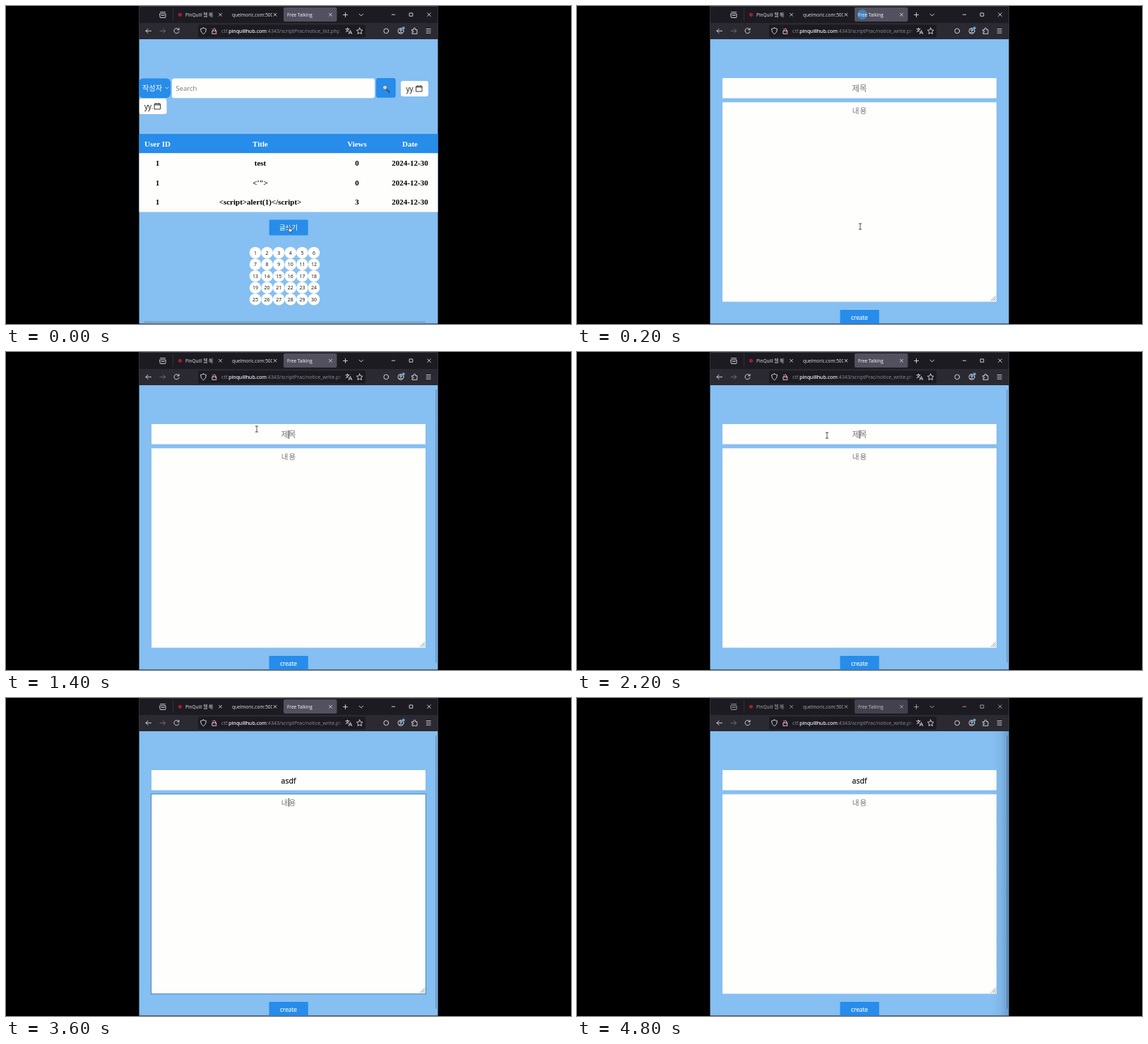
Recreate the animation shown at these times as an HTML page. Size 800 by 450 pixels, loop 5 s.

```html
<!DOCTYPE html>
<html lang="ko">
<head>
<meta charset="utf-8">
<title>Free Talking</title>
<style>
  html, body { margin: 0; width: 100%; height: 100%; overflow: hidden; background: #000; }
  svg { display: block; width: 100vw; height: 100vh; }
  text { font-family: 'Open Sans', 'Noto Sans CJK KR', 'Noto Sans CJK', sans-serif; white-space: pre; }
  .mid { text-anchor: middle; }
  .table text { font: bold 11px 'Liberation Serif', serif; text-anchor: middle; }
  .line { fill: none; stroke: #e0e0e6; stroke-width: .9; stroke-linecap: round; stroke-linejoin: round; }
</style>
</head>
<body>
<svg viewBox="0 0 800 450">
  <defs>
    <linearGradient id="shade">
      <stop offset="0" stop-color="#0b2748" stop-opacity="0"/>
      <stop offset=".5" stop-color="#0b2748" stop-opacity=".06"/>
      <stop offset="1" stop-color="#0b2748" stop-opacity=".24"/>
    </linearGradient>
    <linearGradient id="fade"><stop stop-color="#1c1b22" stop-opacity="0"/><stop offset="1" stop-color="#1c1b22"/></linearGradient>
    <clipPath id="tabClip"><rect x="393" y="2" width="76" height="20" rx="2"/></clipPath>
    <clipPath id="tabText"><path d="M254 0H297V24H254ZM320 0H377V24H320Z"/></clipPath>
    <clipPath id="urlText"><rect x="303" y="26" width="173" height="19"/></clipPath>
    <clipPath id="view"><rect x="188.5" y="47" width="423" height="402.5"/></clipPath>
  </defs>
  <rect width="800" height="450"/>

  <g clip-path="url(#view)">
    <rect x="188" y="47" width="424" height="403" fill="#86bff1"/>
    <g id="list"></g>
    <g id="write">
      <path fill="#fefefd" d="M206 102H594V130.5H206Z"/>
      <path fill="#fefefd" d="M206 136.3H594V418.5H206Z"/>
      <rect id="focus" x="205.5" y="135.8" width="389" height="283" fill="none" stroke="#3f7db5" stroke-width=".9"/>
      <text id="title" class="mid" x="400" y="121"></text>
      <text class="mid" x="400.5" y="151.5" font-size="10.5" letter-spacing="1.2" fill="#777">내용</text>
      <path class="line" style="stroke:#777;stroke-width:.8" d="M586.5 417L593 410.5M589.3 417L593 413.3M592 417L593 416"/>
      <rect x="372.5" y="430" width="55.3" height="22" rx="1" fill="#278cea"/>
      <text class="mid" x="400" y="444.3" font-size="8.3" fill="#fff" stroke="#fff" stroke-width=".15">create</text>
      <g id="suggest">
        <rect x="205.8" y="130.4" width="388.4" height="11.6" rx="2" fill="#2b2a33"/>
        <text x="209" y="138.7" font-size="6.3" fill="#f4f4f6">asdf</text>
      </g>
      <rect id="caret" width=".9" height="12" fill="#222"/>
      <rect id="scroll" x="608.4" y="53" width="1.4" height="387" rx=".7" fill="#6690b8"/>
    </g>
    <rect id="edge" x="588" y="47" width="24" height="403" fill="url(#shade)"/>
  </g>

  <path fill="#1c1b22" d="M188.5 0H611.5V24H188.5Z"/>
  <path fill="#2b2a33" d="M188.5 24H611.5V47H188.5Z"/>
  <path d="M188.5 47V.5H611.5V47" fill="none" stroke="#45464f" stroke-width=".7"/>
  <rect x="272" y="26.5" width="237" height="18" rx="2" fill="#1c1b22"/>
  <rect id="tab" x="393" y="2" width="75.5" height="20" rx="2"/>
  <g clip-path="url(#tabClip)"><circle id="burst" cx="404" cy="12" fill="#3b8fd8"/></g>
  <path d="M236.5 3V21" stroke="#3a3942" stroke-width=".8"/>
  <circle cx="246.5" cy="12.3" r="2.6" fill="#a51d2d"/>
  <g id="bar" font-size="6.5" fill="#e8e8ee">
    <g clip-path="url(#tabText)">
      <text x="254" y="15">PinQuill 웹 해</text>
      <text x="320" y="15">quelmoric.com:5000</text>
    </g>
    <text x="398" y="15" fill="#fbfbfe">Free Talking</text>
    <g id="tabIcons" class="line"></g>
  </g>
  <g id="tools" class="line"></g>
  <g font-size="7.1" clip-path="url(#urlText)">
    <text x="305" y="38.3" fill="#8f8f9b">ctf.<tspan fill="#fbfbfe" stroke="#fbfbfe" stroke-width=".12">pinquillhub.com</tspan><tspan id="path"></tspan></text>
  </g>
  <rect x="469" y="28" width="7" height="15" fill="url(#fade)"/>

  <g id="beam">
    <path class="line" style="stroke:#fff;stroke-width:2" opacity=".6" d="M0 -4V4"/>
    <path class="line" style="stroke:#444" d="M-1.8 -4H1.8M-1.8 4H1.8M0 -4V4"/>
  </g>
  <path id="hand" d="M400.5 312.5q1-.8 1.4.4v2.4l2.6.7q.8.3.6 1.4l-.7 2.4h-3l-2-2.6q.2-1 1.1-.4z" fill="#fff" stroke="#222" stroke-width=".7"/>
</svg>
<script>
const LOOP = 5000, STEP = 100;
const BLUE = '#278cea', WHITE = '#fefefd';
const $ = id => document.getElementById(id);
const show = (id, on) => $(id).style.display = on ? '' : 'none';
const set = (id, attrs) => { for (const k in attrs) $(id).setAttribute(k, attrs[k]); };
const clamp = v => Math.min(1, Math.max(0, v));

const box = (x, y, w, h, fill, rx = 0) =>
  `<rect x="${x}" y="${y}" width="${w}" height="${h}" rx="${rx}" fill="${fill}"/>`;
const label = (x, y, size, fill, text, cls = '') =>
  `<text x="${x}" y="${y}" font-size="${size}" fill="${fill}" class="${cls}">${text.replace(/</g, '&lt;')}</text>`;
const line = (d, extra = '') => `<path d="${d}" ${extra}/>`;
const cross = (x, y, r) => line(`M${x - r} ${y - r}l${2 * r} ${2 * r}M${x + r} ${y - r}l${-2 * r} ${2 * r}`);

function dateField(x, y) {
  return box(x, y, 39, 22, WHITE, 3) + label(x + 7.5, y + 14.5, 10, '#111', 'yy') +
    box(x + 18.2, y + 13.6, 1, 1, '#555') +
    `<g class="line" style="stroke:#222">${line(`M${x + 22} ${y + 7.5}h8v7.5h-8zM${x + 22} ${y + 9}h8M${x + 24} ${y + 6.5}v1M${x + 28} ${y + 6.5}v1`)}</g>`;
}

function listPage() {
  const columns = [214.5, 360, 497, 572];
  const rows = [
    ['User ID', 'Title', 'Views', 'Date'],
    ['1', 'test', '0', '2024-12-30'],
    ['1', `<'">`, '0', '2024-12-30'],
    ['1', '<script>alert(1)<\/script>', '3', '2024-12-30']
  ];
  const cells = rows.map((row, r) => row.map((text, c) =>
    label(columns[c], 198.5 + r * 27.6, 11, r ? '#000' : '#fff', text)).join('')).join('');
  let pages = '';
  for (let i = 0; i < 30; i++) {
    const x = 353 + i % 6 * 16.6, y = 349.2 + Math.floor(i / 6) * 16.5;
    pages += `<circle cx="${x}" cy="${y}" r="8.3" fill="${WHITE}"/>` + label(x, y + 2.6, 7, '#111', `${i + 1}`, 'mid');
  }
  return box(188, 102.5, 45, 27.5, BLUE, 6) + label(193, 120, 10.2, '#fff', '작성자') +
    line('M226 115l2 2 2-2', 'class="line"') +
    box(235, 102.5, 287, 27.7, WHITE, 3) + label(240.3, 120, 9.6, '#777', 'Search') +
    box(524, 102, 27.7, 27.7, BLUE, 3) +
    line('M539 118l4 4', 'stroke="#40505f" stroke-width="1.8" stroke-linecap="round"') +
    '<circle cx="536.5" cy="115.3" r="3" fill="#b9dcf5" stroke="#5b6f82"/>' +
    dateField(559, 106) + dateField(188.5, 131) +
    box(188, 181, 424, 27.3, BLUE) + box(188, 208.3, 424, 83.2, WHITE) +
    `<g class="table">${cells}</g>` +
    box(372.7, 302.5, 55, 22, BLUE, 1) + label(400, 316.8, 9.5, '#fff', '글쓰기', 'mid') +
    pages + box(195, 446.7, 399, .9, '#6d8299');
}

function tabIcons() {
  return line('M218 11h8v4.5q0 1-1 1h-6q-1 0-1-1zM218.5 8.7h7M220 13.5h4') +
    [303.5, 381, 459.5].map(x => cross(x, 12.3, 1.9)).join('') +
    line('M477.5 12.5h6M480.5 9.5v6M500 11.2l2.8 2.8 2.8-2.8M546.3 12.2h4.4M571.5 10h4.3v4.3h-4.3z') +
    cross(599, 12.2, 2.3);
}

function toolIcons() {
  return line('M205.5 35.3h-7.5m3-3l-3 3 3 3') +
    line('M218 35.3h7.5m-3-3l3 3-3 3', 'stroke="#74737d"') +
    line('M244.7 33.3a3.6 3.6 0 1 0 .3 3M245 31.5v2.3h-2.4') +
    line('M279.5 31q2 1.3 4 1.3 0 5.5-4 7.5-4-2-4-7.5 2 0 4-1.3z') +
    line('M292.3 35h5.4v4.3h-5.4zM293.3 35v-1.8q1.7-3 3.4 0v1.8') +
    line('M291.5 31.5l7 8', 'stroke="#e22850"') +
    line('M481 32.5h5M483.5 31v1.5M485.3 32.5q-1 3-4 4.2M482 34l3 2.3M485.3 39.5l2.2-5 2.2 5M486.2 38h2.7') +
    line('M500.7 31l1.3 2.8 3 .4-2.2 2.1.6 3.1-2.7-1.5-2.7 1.5.6-3.1-2.2-2.1 3-.4z') +
    '<circle cx="538.3" cy="35.3" r="3.4"/><circle cx="559" cy="35.3" r="4"/><circle cx="559" cy="34" r="1.3"/>' +
    line('M556.5 38q2.5-2.4 5 0') +
    '<circle cx="562.8" cy="31.2" r="1.9" fill="#45b5f5" stroke="none"/>' +
    line('M575 33.5h2.3q-.7-2.5 1.2-2.5t1.2 2.5h2.3v5.8h-7v-2q2 .2 2-1t-2-1z') +
    line('M595.2 32.5h6M595.2 35.3h6M595.2 38.1h6');
}

$('list').innerHTML = listPage();
$('tabIcons').innerHTML = tabIcons();
$('tools').innerHTML = toolIcons();

const OPENED = 200, TITLE_FOCUS = 1100, TYPING = 2500, AREA_FOCUS = 3300, BLUR = 4000;

// time, x, y of the text pointer
const POINTER = [[OPENED, 401, 312], [500, 401, 312], [1100, 355, 109], [1400, 355, 109],
  [1700, 354, 118], [TYPING, 354, 118], [2900, 406, 218], [AREA_FOCUS, 406, 218]];

function pointerAt(t) {
  const i = Math.max(1, POINTER.findIndex(p => p[0] > t));
  const [t0, x0, y0] = POINTER[i - 1], [t1, x1, y1] = POINTER[i];
  const k = clamp((t - t0) / (t1 - t0));
  const ease = k * k * (3 - 2 * k);
  return [x0 + (x1 - x0) * ease, y0 + (y1 - y0) * ease];
}

function render(time) {
  const t = Math.floor(time / STEP) * STEP;
  const writing = t >= OPENED, blurred = t >= BLUR;
  const inArea = t >= AREA_FOCUS && !blurred;

  show('list', !writing);
  show('hand', !writing);
  show('write', writing);
  $('path').textContent = `:4343/scriptPrac/notice_${writing ? 'write' : 'list'}.php`;

  const typed = 'asdf'.slice(0, Math.max(0, (t - TYPING) / STEP + 1));
  const ink = typed ? '#111' : '#777';
  $('title').textContent = typed || '제목';
  set('title', { 'font-size': typed ? 10.6 : 11.4, fill: ink, stroke: ink, 'stroke-width': typed ? .25 : 0 });
  show('suggest', typed && t < AREA_FOCUS);
  show('focus', inArea);

  const since = t - (inArea ? AREA_FOCUS : typed ? TYPING + 300 : TITLE_FOCUS);
  show('caret', t >= TITLE_FOCUS && !blurred && (since < 0 || since % 1000 < 500));
  const titleCaret = 400 + typed.length * 2.65;
  set('caret', { x: inArea ? 400 : titleCaret, y: inArea ? 141.7 : 110.7 });

  show('scroll', t >= 700);
  show('beam', writing && t < AREA_FOCUS);
  set('beam', { transform: `translate(${pointerAt(t)})` });

  const burst = (t - OPENED) / 375;
  show('burst', burst >= 0 && burst < 1);
  set('burst', { r: 7 + 70 * clamp(burst), opacity: .75 * (1 - clamp(burst)) });

  set('tab', { fill: blurred ? '#42414d' : '#53515f' });
  set('bar', { opacity: blurred ? .72 : 1 });
  set('edge', { opacity: clamp((t - BLUR + STEP) / 300) });
}

function tick() {
  render(performance.now() % LOOP);
  requestAnimationFrame(tick);
}
tick();
</script>
</body>
</html>
```
